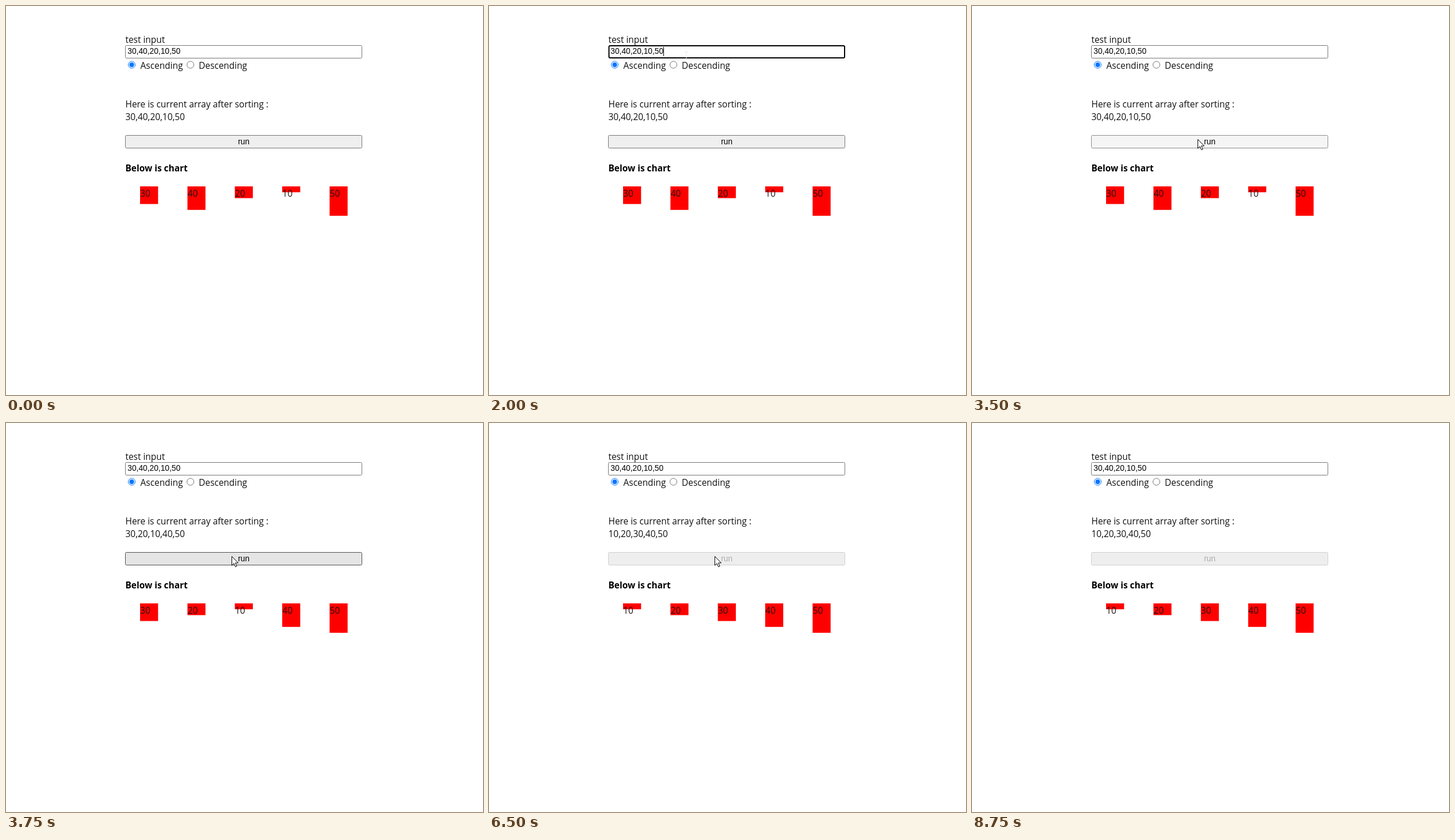
An HTML page that plays this animation: 829x675 px, repeating every 9.5 s.

```html
<!DOCTYPE html>
<html lang="en">
<head>
<meta charset="utf-8">
<title>Sorting chart</title>
<style>
  html, body { margin: 0; width: 100%; height: 100%; overflow: hidden; background: #fff; }
  svg { display: block; width: 829px; height: 675px; }
  text { font: 15.45px "Open Sans", "Noto Sans", sans-serif; fill: #111; white-space: pre; }
  .control { font: 13.75px "Liberation Sans", Arial, sans-serif; fill: #000; }
  .bold { font-weight: 700; fill: #000; }
  #bars text { fill: #211; }
</style>
</head>
<body>
<svg viewBox="0 0 829 675">
  <text x="207.5" y="64">test input</text>
  <rect id="field" rx="2" fill="#fff"/>
  <text class="control" x="211.3" y="83">30,40,20,10,50</text>
  <path id="caret" d="M303.5 71v16" stroke="#000"/>

  <circle cx="218.5" cy="102" r="6" fill="#fff" stroke="#0075ff"/>
  <circle cx="218.5" cy="102" r="4" fill="#0075ff"/>
  <text x="233.5" y="108.5">Ascending</text>
  <circle cx="320.5" cy="102" r="6" fill="#fff" stroke="#767676"/>
  <text x="335" y="108.5">Descending</text>

  <text x="207.5" y="175.5">Here is current array after sorting :</text>
  <text id="list" x="207.5" y="197.5"></text>

  <rect id="button" x="207.5" y="224.5" width="411" height="22" rx="2"/>
  <text id="run" class="control" x="413.2" y="239.5" text-anchor="middle">run</text>

  <text class="bold" x="207.5" y="286.5">Below is chart</text>
  <g id="bars"></g>

  <path id="beam" d="M340 79.5h6M343 80v12M340 92.5h6" stroke="#e8e8e8" fill="none"/>
  <path id="arrow" d="M.5 .5v15.6l3.6-3.4 2.6 5.9 2.5-1.1-2.6-5.7h5z" fill="#fff" stroke="#000"/>
</svg>
<script>
const LOOP = 9500;
const $ = id => document.getElementById(id);
const setAttrs = (el, attrs) => {
  for (const key in attrs) el.setAttribute(key, attrs[key]);
};

// Latest entry of a [time, value] track that has started.
const at = (track, t) => track.filter(([start]) => start <= t).pop()[1];

const looks = {
  idle: ["#efefef", "#767676", "#000"],
  hover: ["#e5e5e5", "#4f4f4f", "#000"],
  pressed: ["#f5f5f5", "#8d8d8d", "#000"],
  disabled: ["#eeeeee", "#cfcfcf", "#aaa"]
};

const arrowTrack = [
  [0, null], [1500, [352, 95]], [1750, null], [2250, [446, 184]],
  [2500, [392, 231]], [8250, [395, 234]], [8500, [445, 565]], [8750, null]
];
const buttonTrack = [
  [0, "idle"], [2750, "hover"], [3500, "pressed"], [3750, "hover"],
  [5500, "pressed"], [5750, "hover"], [6500, "disabled"]
];

// One bubble-sort pass per click.
const bubblePass = values => {
  const next = [...values];
  for (let i = 1; i < next.length; i++)
    if (next[i - 1] > next[i]) [next[i - 1], next[i]] = [next[i], next[i - 1]];
  return next;
};
const arrayTrack = [[0, [30, 40, 20, 10, 50]]];
for (const time of [3750, 5750, 6500])
  arrayTrack.push([time, bubblePass(arrayTrack.at(-1)[1])]);

const add = (tag, attrs) => {
  const el = document.createElementNS("http://www.w3.org/2000/svg", tag);
  setAttrs(el, attrs);
  return $("bars").appendChild(el);
};
const bars = Array.from({ length: 5 }, (_, i) => {
  const x = 233 + i * 82.35;
  return {
    rect: add("rect", { x, y: 313, width: 31.3, fill: "#f00" }),
    label: add("text", { x: x + .3, y: 331 })
  };
});

const show = (id, visible) => $(id).style.display = visible ? "" : "none";

function draw(t) {
  const values = at(arrayTrack, t);
  $("list").textContent = values.join();
  bars.forEach(({ rect, label }, i) => {
    rect.setAttribute("height", values[i] * 1.02);
    label.textContent = values[i];
  });

  const focused = t >= 1750 && t < 3500;
  setAttrs($("field"), focused
    ? { x: 208.5, y: 69, width: 409.5, height: 21, stroke: "#000", "stroke-width": 2 }
    : { x: 207.5, y: 68.5, width: 411, height: 22, stroke: "#767676", "stroke-width": 1 });
  show("caret", focused && (t < 2500 || t >= 3000));
  show("beam", t >= 1750 && t < 2250);

  const [fill, stroke, ink] = looks[at(buttonTrack, t)];
  setAttrs($("button"), { fill, stroke });
  $("run").style.fill = ink;

  const tip = at(arrowTrack, t);
  show("arrow", tip);
  if (tip) $("arrow").setAttribute("transform", `translate(${tip})`);
}

const begin = performance.now();
function tick() {
  draw((performance.now() - begin) % LOOP);
  requestAnimationFrame(tick);
}
tick();
</script>
</body>
</html>
```
